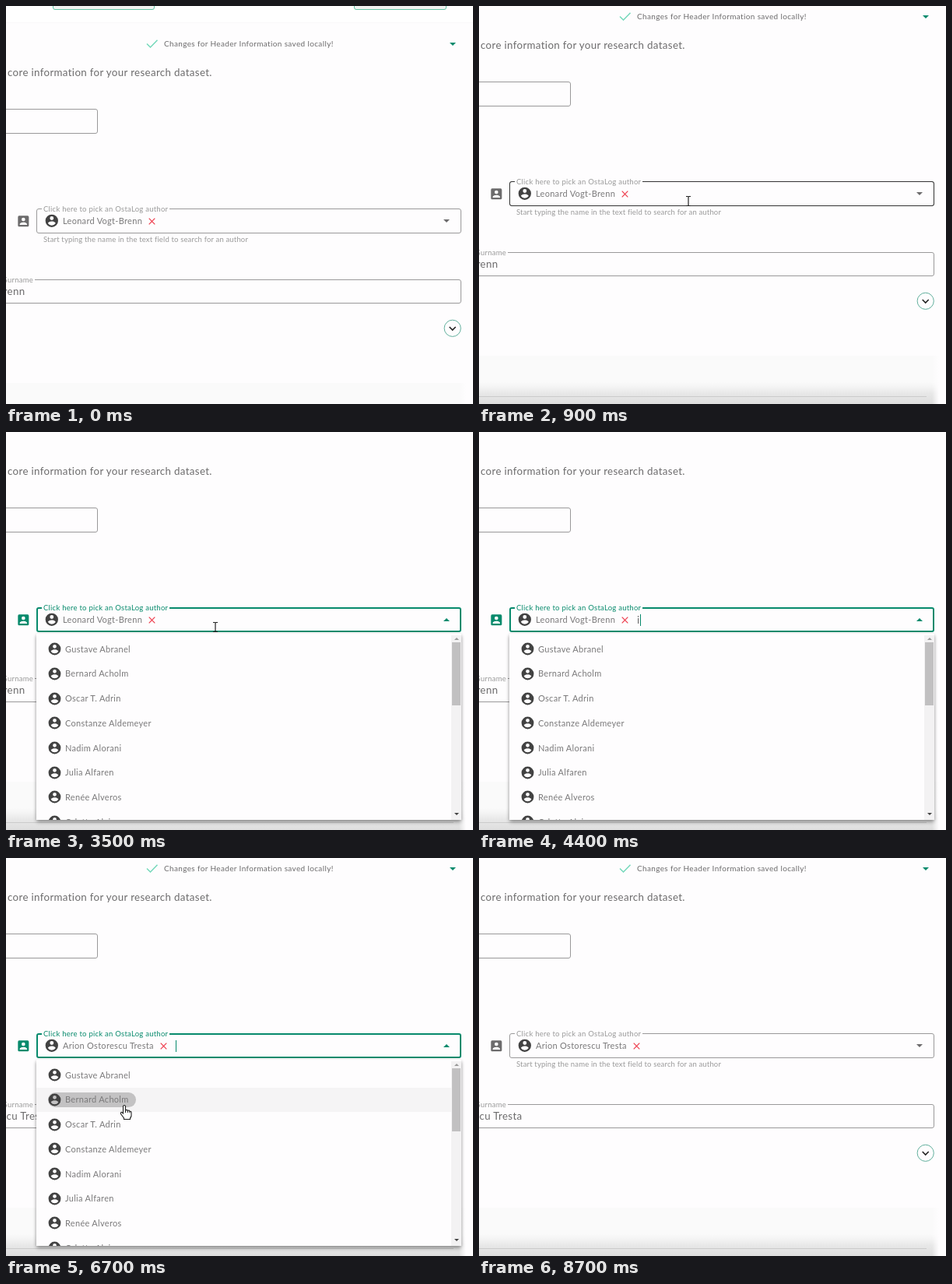
An HTML page that plays this animation: 600x511 px, repeating every 9000 ms.

```html
<!DOCTYPE html>
<html lang="en">
<head>
<meta charset="utf-8">
<title>Author picker</title>
<style>
  :root { --bg: #fefdfe; --green: #078a6c; --ink: #6c6b6c; }
  html, body { margin: 0; width: 100%; height: 100%; overflow: hidden; background: var(--bg); }
  body { position: relative; }
  .stage { position: absolute; left: 0; top: 0; width: 600px; height: 511px; overflow: hidden;
    font: 11px/20px Lato, "Open Sans", sans-serif; letter-spacing: .3px; color: #7a797a; white-space: nowrap; }
  .stage * { box-sizing: border-box; }
  .page, .at, .pointer, .pointer svg { position: absolute; }
  .page { inset: 0; animation: scroll 9s infinite; }
  svg { display: block; overflow: visible; flex: none; }
  .icon { fill: #424242; width: 19.6px; height: 19.6px; }

  .big { font-size: 13.3px; letter-spacing: .35px; color: var(--ink); }
  .small { font-size: 9.5px; letter-spacing: .25px; line-height: 12px; color: #999; }
  .hint { letter-spacing: .16px; }
  .label { background: var(--bg); padding: 0 2px; }
  .box { border: 1px solid #9a999a; border-radius: 3px; }
  .button { top: -61px; height: 31px; border: 1.5px solid #62c4a6; border-radius: 3px; background: #f1f3f2; }
  .status { left: 203px; top: 3px; font-size: 10px; letter-spacing: .36px; color: var(--ink); }

  .footer { left: 0; top: 449px; width: 600px; height: 70px;
    background: linear-gradient(90deg, transparent 582px, var(--bg) 591px),
      linear-gradient(#fafafa 0 34px, #f4f4f4 40px, #e8e8e8 48px, #dedede 62px); }
  .footer::after { content: ""; position: absolute; left: 0; top: 52px; width: 575px; height: 1px; background: #cbcbcb; }

  .field { left: 39px; top: 225px; width: 546px; height: 32px; }
  .chip { left: 49px; top: 231px; height: 20px; display: flex; align-items: center; }
  .chip .icon { margin-right: 4.4px; }
  .chip .remove { margin: 0 11px 0 8px; }
  .caret { width: 1px; height: 15px; background: var(--green); }
  .key { overflow: hidden; max-width: 0; }
  .surname { height: 20px; right: 575.5px; }
  .surname.new { right: 544.5px; }

  .drop { left: 39px; top: 259px; width: 546px; height: 239px; border-radius: 0 0 3px 3px;
    box-shadow: 0 3px 5px rgba(0,0,0,.33), 0 1px 4px rgba(0,0,0,.14); }
  .drop.short { height: 74px; }
  .menu { inset: 0; padding-top: 4px; overflow: hidden; background: var(--bg); }
  .row { position: relative; height: 31.7px; padding: 6.3px 0 0 15px; }
  .row span { position: relative; display: inline-flex; align-items: center; height: 19px; padding-right: 9px; }
  .row .icon { position: relative; width: 19px; height: 19px; margin: 0 4px 0 -1px; }
  .row b { position: relative; font-weight: 400; }
  .hot { position: absolute; inset: 0; background: #f5f4f5; }
  .row span .hot { background: #c3c2c3; border-radius: 10px; }
  .bar { right: 0; top: 2px; width: 13px; height: 237px; background: #f3f2f3; }
  .bar i { position: absolute; left: 1px; top: 9px; width: 11px; height: 81px; background: #c1c0c1; }

  /* discrete states */
  .idle, .hovered, .active, .old, .new, .full, .short, .caret, .key, .status, .check,
  .overShort, .overFull, .beam, .arrow, .hand { animation: 9s step-end infinite; }
  .idle { animation-name: idle; }
  .hovered { animation-name: hovered; }
  .active { animation-name: active; }
  .old { animation-name: old; }
  .new { animation-name: new; }
  .full { animation-name: full; }
  .short { animation-name: short; }
  .status, .check { animation-name: status; }
  .overShort { animation-name: overShort; }
  .overFull { animation-name: overFull; }
  .caret.first { animation-name: blinkFirst; }
  .caret.second { animation-name: blinkSecond; }
  .k1 { animation-name: k1; }
  .k2 { animation-name: k2; }
  .k3 { animation-name: k3; }
  .beam { animation-name: beam; }
  .arrow { animation-name: arrow; }
  .hand { animation-name: hand; }
  .pointer { left: 0; top: 0; animation: move 9s infinite; }

  @keyframes scroll {
    0%, 1.111% { transform: translateY(35px); animation-timing-function: ease-in-out; }
    4.444%, 100% { transform: none; }
  }
  @keyframes idle { 0%, 84.444%, 100% { opacity: 1; } 15.556% { opacity: 0; } }
  @keyframes active { 0%, 84.444%, 100% { opacity: 0; } 15.556% { opacity: 1; } }
  @keyframes hovered { 0%, 15.556%, 100% { opacity: 0; } 4.444% { opacity: 1; } }
  @keyframes old { 0% { opacity: 1; } 71.111%, 100% { opacity: 0; } }
  @keyframes new { 0% { opacity: 0; } 71.111%, 100% { opacity: 1; } }
  @keyframes full { 0%, 50%, 84.444%, 100% { opacity: 0; } 15.556%, 71.111% { opacity: 1; } }
  @keyframes short { 0%, 71.111%, 100% { opacity: 0; } 50% { opacity: 1; } }
  @keyframes status { 0%, 72.222%, 100% { opacity: 1; } 15.556% { opacity: 0; } }
  @keyframes overShort { 0%, 71.111%, 100% { opacity: 0; } 67.778% { opacity: 1; } }
  @keyframes overFull { 0%, 80%, 100% { opacity: 0; } 71.111% { opacity: 1; } }
  @keyframes blinkFirst {
    0%, 21.444%, 33.222%, 45%, 58.111%, 69.889%, 100% { opacity: 0; }
    15.556%, 27.333%, 39.111%, 47.778%, 64% { opacity: 1; }
  }
  @keyframes blinkSecond { 0%, 77%, 84.444%, 100% { opacity: 0; } 71.111%, 82.889% { opacity: 1; } }
  @keyframes k1 { 0%, 71.111%, 100% { max-width: 0; } 47.778% { max-width: 20px; } }
  @keyframes k2 { 0%, 71.111%, 100% { max-width: 0; } 50% { max-width: 20px; } }
  @keyframes k3 { 0%, 71.111%, 100% { max-width: 0; } 52.222% { max-width: 20px; } }
  @keyframes beam { 0%, 47.778%, 100% { opacity: 0; } 3.333% { opacity: 1; } }
  @keyframes arrow { 0%, 67.778%, 92.222%, 100% { opacity: 0; } 63.333%, 80% { opacity: 1; } }
  @keyframes hand { 0%, 80%, 100% { opacity: 0; } 67.778% { opacity: 1; } }
  @keyframes move {
    0%, 3.333% { transform: translate(300px, 275px); }
    4.444%, 63.333% { transform: translate(269px, 250px); animation-timing-function: ease-in-out; }
    67.778%, 80% { transform: translate(152px, 317px); animation-timing-function: ease-in-out; }
    83.333%, 88.889% { transform: translate(250px, 175px); }
    92.222%, 100% { transform: translate(420px, 120px); }
  }
</style>
</head>
<body>
<svg width="0" height="0" style="position:absolute">
  <symbol id="user" viewBox="0 0 24 24"><path d="M12 2a10 10 0 100 20 10 10 0 000-20zm0 3a3 3 0 110 6 3 3 0 010-6zm0 14.2a7.2 7.2 0 01-6-3.2c0-2 4-3.1 6-3.1s6 1.1 6 3.1a7.2 7.2 0 01-6 3.2z"/></symbol>
  <symbol id="card" viewBox="0 0 24 24"><path d="M3 5v14a2 2 0 002 2h14a2 2 0 002-2V5a2 2 0 00-2-2H5a2 2 0 00-2 2zm12 4a3 3 0 11-6 0 3 3 0 016 0zm-9 8c0-2 4-3.1 6-3.1s6 1.1 6 3.1v1H6z"/></symbol>
  <symbol id="cross" viewBox="0 0 9 9"><path d="M.7.7l7.6 7.6M8.3.7L.7 8.3" stroke="#ee3a4a" stroke-width="1.2"/></symbol>
  <symbol id="down" viewBox="0 0 8 4"><path d="M0 0h8L4 4z"/></symbol>
  <symbol id="up" viewBox="0 0 8 4"><path d="M0 4h8L4 0z"/></symbol>
</svg>

<div class="stage">
  <div class="page">
    <div class="at" style="left:0;top:-60px;width:600px;height:47px;background:#fff;border-bottom:1px solid #f9f8f9"></div>
    <div class="at button" style="left:60px;width:131px"></div>
    <div class="at button" style="left:447px;width:119px"></div>

    <svg class="at check" style="left:181px;top:8px" width="14" height="11"><path d="M0 5.5l4.5 4.5L13.5.8" fill="none" stroke="#74d8ba" stroke-width="1.5"/></svg>
    <div class="at status">Changes for Header Information saved locally!</div>
    <svg class="at check" style="left:569.5px;top:11.5px" width="8" height="4" fill="#078a6c"><use href="#down"/></svg>

    <div class="at big" style="left:2px;top:39.5px">core information for your research dataset.</div>
    <div class="at box" style="left:-20px;top:97px;width:138px;height:32px"></div>

    <div class="at footer"></div>

    <div class="at box" style="left:-20px;top:316px;width:605px;height:31px"></div>
    <div class="at small label" style="right:563px;top:310.5px">Surname</div>
    <div class="at big surname old" style="top:321px">Vogt-Brenn</div>
    <div class="at big surname new" style="top:321px">Ostorescu Tresta</div>
    <svg class="at" style="left:562px;top:367px" width="24" height="24" fill="none">
      <circle cx="11.7" cy="11.8" r="10.6" stroke="#5fae9b"/>
      <path d="M7.7 10l4 4 4-4" stroke="#222" stroke-width="1.6"/>
    </svg>

    <div class="idle">
      <svg class="at" style="left:12.6px;top:231.6px" width="18.7" height="18.7" fill="#6c6b6c"><use href="#card"/></svg>
      <div class="at box field"></div>
      <div class="at box field hovered" style="border-color:#333"></div>
      <div class="at small label" style="left:46px;top:220px">Click here to pick an OstaLog author</div>
      <div class="at small hint" style="left:48px;top:259px">Start typing the name in the text field to search for an author</div>
      <svg class="at" style="left:562px;top:239px" width="8" height="4" fill="#6c6b6c"><use href="#down"/></svg>
    </div>

    <div class="active">
      <svg class="at" style="left:12.6px;top:231.6px" width="18.7" height="18.7" fill="#078a6c"><use href="#card"/></svg>
      <div class="at box field" style="border:2px solid var(--green)"></div>
      <div class="at small label" style="left:46px;top:220px;color:var(--green)">Click here to pick an OstaLog author</div>
      <svg class="at" style="left:562px;top:239px" width="8" height="4" fill="#078a6c"><use href="#up"/></svg>
    </div>

    <div class="at chip old">
      <svg class="icon"><use href="#user"/></svg>Leonard Vogt-Brenn
      <svg class="remove" width="9" height="9"><use href="#cross"/></svg>
      <span class="big key k1">i</span><span class="big key k2">o</span><span class="big key k3">n</span>
      <i class="caret first"></i>
    </div>
    <div class="at chip new">
      <svg class="icon"><use href="#user"/></svg>Arion Ostorescu Tresta
      <svg class="remove" width="9" height="9"><use href="#cross"/></svg>
      <i class="caret second"></i>
    </div>

    <div class="at drop full">
      <div class="at menu">
        <div class="row"><span><svg class="icon"><use href="#user"/></svg><b>Gustave Abranel</b></span></div>
        <div class="row"><i class="hot overFull"></i><span><i class="hot overFull"></i><svg class="icon"><use href="#user"/></svg><b>Bernard Acholm</b></span></div>
        <div class="row"><span><svg class="icon"><use href="#user"/></svg><b>Oscar T. Adrin</b></span></div>
        <div class="row"><span><svg class="icon"><use href="#user"/></svg><b>Constanze Aldemeyer</b></span></div>
        <div class="row"><span><svg class="icon"><use href="#user"/></svg><b>Nadim Alorani</b></span></div>
        <div class="row"><span><svg class="icon"><use href="#user"/></svg><b>Julia Alfaren</b></span></div>
        <div class="row"><span><svg class="icon"><use href="#user"/></svg><b>Renée Alveros</b></span></div>
        <div class="row"><span><svg class="icon"><use href="#user"/></svg><b>Odette Alvin</b></span></div>
        <div class="at bar">
          <i></i>
          <svg class="at" style="left:3.5px;top:2.5px" width="6" height="3" fill="#999"><use href="#up"/></svg>
          <svg class="at" style="left:3.5px;top:228px" width="6" height="3" fill="#444"><use href="#down"/></svg>
        </div>
      </div>
    </div>

    <div class="at drop short">
      <div class="at menu">
        <div class="row"><span><svg class="icon"><use href="#user"/></svg><b>Tobias Garion</b></span></div>
        <div class="row"><i class="hot overShort"></i><span><i class="hot overShort"></i><svg class="icon"><use href="#user"/></svg><b>Arion Ostorescu Tresta</b></span></div>
      </div>
    </div>
  </div>

  <div class="pointer">
    <svg class="beam" width="1" height="1"><path d="M-3-5.5h2.2L0-4.8.8-5.5H3M0-5V6M-3 6.5h2.2L0 5.8l.8.7H3" fill="none" stroke="#222" stroke-width="1.2"/></svg>
    <svg class="arrow" width="1" height="1"><path d="M0 0v15l3.5-3.3 2.4 5.3 2.2-1-2.3-5.2H11z" fill="#fff" stroke="#222"/></svg>
    <svg class="hand" width="1" height="1">
      <path d="M-1.5 1.5Q0-.5 1.5 1.5V7Q3.5 5.5 4.3 7.5 6.3 6.3 6.9 8.3 9 7.8 9 10v4Q8.5 16 7.5 17v1.5H-.5V17L-4.5 11.5Q-5 9-3 9.5L-1.5 11z" fill="#fff" stroke="#222" stroke-width="1.1"/>
      <path d="M1.5 7v3M4.3 7.5V10M6.9 8.3v2" stroke="#222"/>
    </svg>
  </div>
</div>
</body>
</html>
```
